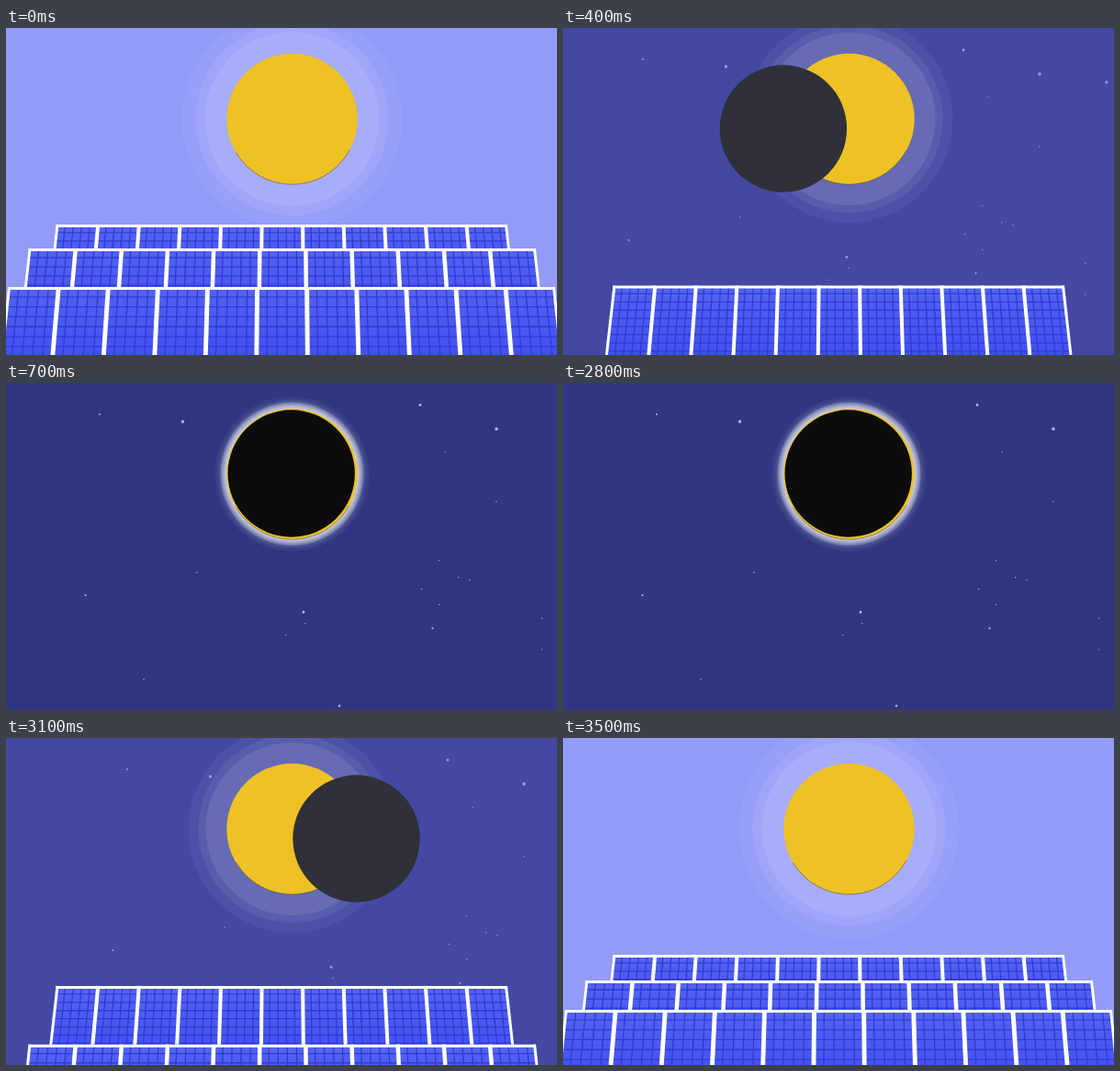
An HTML page with a canvas that plays this animation: 600 px wide and 356 px high, repeating every 5.5 s.

```html
<!DOCTYPE html>
<html lang="en">
<head>
<meta charset="utf-8">
<title>Solar eclipse over solar panels</title>
<style>
  html, body { margin: 0; width: 100%; height: 100%; overflow: hidden; background: #939bf8; }
  canvas { display: block; width: 600px; height: 356px; }
</style>
</head>
<body>
<canvas id="stage" width="600" height="356"></canvas>
<script>
const ctx = document.getElementById('stage').getContext('2d');
const W = 600, H = 356, LOOP = 5500, STEP = 100;
const SUN = { x: 311.5, y: 99, r: 71.2 };
const COLUMNS = 11, CELLS = 5, GRID = '#2e3bd0';

// Sky at darkness levels 0, 2, 4 and 6
const SKY = [[147, 155, 248], [103, 110, 212], [67, 73, 163], [47, 55, 128]];

// Left and right edge, height at the start and at the end of the loop
const ROWS = [
  { l: 54.5, r: 546, y: 214, end: 236 },
  { l: 24.5, r: 577, y: 240, end: 264 },
  { l: 2, r: 598, y: 282, end: 296 }
];

// Bright stars by place, faint ones scattered
const STARS = [[102, 34, 1], [192.5, 42, 1.7], [451, 24, 1.4], [534, 50, 1.8], [607, 59, 1.6],
               [86.5, 231, 1.1], [324, 249.5, 1.4], [464.5, 267, 1.1], [363, 351.5, 1.3]];
let seed = 7;
const random = () => (seed = seed * 16807 % 2147483647) / 2147483647;
for (let i = 0; i < 14; i++) STARS.push([150 + 470 * random(), 60 + 285 * random(), .7]);

function skyColor(level) {
  const i = Math.min(2, Math.floor(level / 2)), k = level / 2 - i;
  return `rgb(${SKY[i].map((v, j) => Math.round(v + (SKY[i + 1][j] - v) * k))})`;
}

function disc(x, y, r, color) {
  ctx.fillStyle = color;
  ctx.beginPath();
  ctx.arc(x, y, r, 0, 7);
  ctx.fill();
}

function line(x1, y1, x2, y2, width, color) {
  ctx.strokeStyle = color;
  ctx.lineWidth = width;
  ctx.beginPath();
  ctx.moveTo(x1, y1);
  ctx.lineTo(x2, y2);
  ctx.stroke();
}

function drawSun(level) {
  const glow = (r, alpha) => disc(SUN.x, SUN.y, r, `rgba(255,255,255,${alpha})`);
  const grow = Math.max(.32, 1 + .08 * level - .0014 * level ** 4);
  for (let i = 2; i >= 0; i--)
    glow(71 + 24 * grow * (1.43 - .02 * level) ** i, .085 - .02 * i);
  const corona = Math.max(0, level - 4) / 2;
  for (let r = 78; r > 71; r -= 1.5) glow(r, .2 * corona);

  disc(SUN.x, SUN.y, SUN.r, '#eec224');
  ctx.strokeStyle = 'rgba(85,65,40,.7)';
  ctx.lineWidth = .7;
  ctx.beginPath();
  ctx.arc(SUN.x, SUN.y, SUN.r, .5, 2.6);
  ctx.stroke();
}

function drawMoon(level, side) {
  if (!level) return;
  const d = Math.max(0, 4.88 - level) * 80.5;
  const gray = Math.max(12, 288 - 60 * level);
  const blue = gray + (level === 4 ? 9 : 0);
  disc(310.7 + side * d, 98.5 + .106 * d + .000708 * d * d, 69.2, `rgb(${gray},${gray},${blue})`);
}

function drawRow({ l, r }, top, index) {
  if (top >= H) return;
  const depth = H - top, slope = .00046 * .88 ** index;
  const spread = (x, dy) => 301 + (x - 301) * (1 + slope * dy);
  const rail = (x, width, color) => line(x, top, spread(x, depth), H, width, color);

  const fill = ctx.createLinearGradient(0, top, 0, top + 75);
  fill.addColorStop(0, '#5463f3');
  fill.addColorStop(1, '#4150f0');
  ctx.fillStyle = fill;
  ctx.beginPath();
  ctx.moveTo(l, top);
  ctx.lineTo(r, top);
  ctx.lineTo(spread(r, depth), H);
  ctx.lineTo(spread(l, depth), H);
  ctx.fill();

  const first = l + 1.2, cell = (r - first) / COLUMNS / CELLS;
  for (let dy = cell; dy < depth; dy += cell)
    line(spread(l, dy), top + dy, spread(r, dy), top + dy, 1.3, GRID);
  for (let i = 1; i < COLUMNS * CELLS; i++)
    if (i % CELLS) rail(first + i * cell, 1.3, GRID);
  for (let i = CELLS; i < COLUMNS * CELLS; i += CELLS)
    rail(first + i * cell, cell * .45, '#fff');
  rail(l + 1.5, 3, '#fff');
  rail(r - 1.5, 3, '#fff');
  line(l, top + 1.5, r, top + 1.5, 3, '#fff');
}

function draw(n) {
  const leaving = n >= 28;
  const level = Math.min(6, leaving ? Math.max(0, 35 - n) : n);
  ctx.fillStyle = skyColor(level);
  ctx.fillRect(0, 0, W, H);

  drawSun(level);
  const drift = 15 * (leaving ? Math.max(0, n - 29) : Math.min(0, n - 5));
  const glint = `rgba(225,228,245,${Math.min(.75, .14 * level)})`;
  for (const [x, y, r] of STARS) disc(x + drift, y, r, glint);
  drawMoon(level, leaving ? 1 : -1);

  // Nearer rows sink and rise faster
  ROWS.forEach((row, i) => {
    const fall = 24 * 1.67 ** i * (n / 2) ** (1.47 + .13 * i);
    const rise = 34 * 2.05 ** i * (Math.max(0, 35 - n) / 4) ** 2.3;
    drawRow(row, leaving ? row.end + rise : row.y + fall, i);
  });
}

const start = performance.now();
function tick() {
  draw(Math.floor((performance.now() - start) % LOOP / STEP));
  requestAnimationFrame(tick);
}
tick();
</script>
</body>
</html>
```
